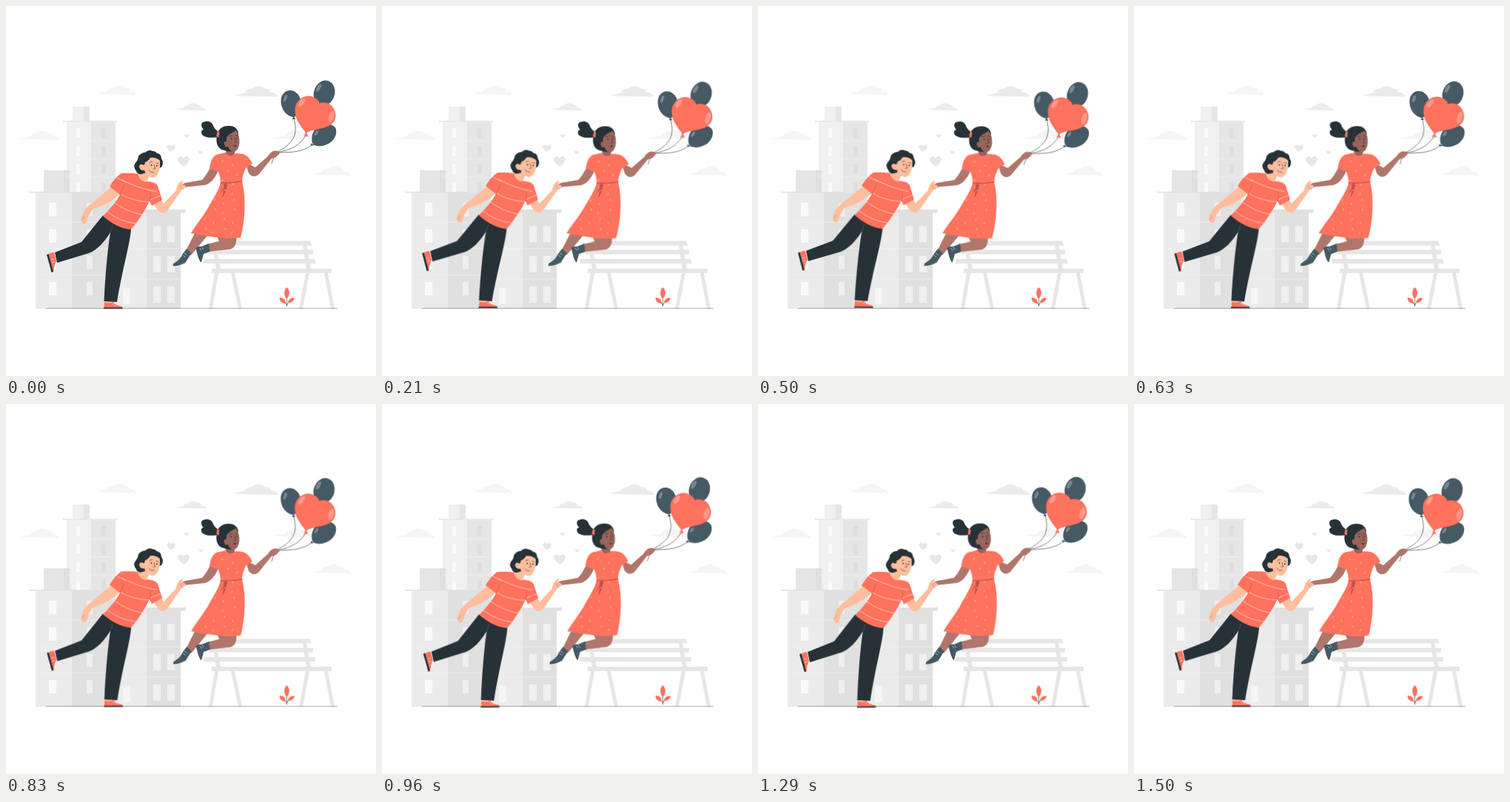
Recreate the animation shown at these times as an HTML page. Size 500 by 500 pixels, loop 1.54 s.

```html
<!DOCTYPE html>
<html lang="en">
<head>
<meta charset="utf-8">
<title>Couple with balloons</title>
<style>
html, body { margin: 0; width: 100%; height: 100%; overflow: hidden; background: #fff; }
svg { display: block; width: 100vw; height: 100vh; }
path { stroke-linecap: round; stroke-linejoin: round; }
.red { fill: #ff725e; }
.ink { fill: #263238; }
.slate { fill: #455a64; }
.peach { fill: #ffbe9d; }
.brown { fill: #b0766b; }
.face { fill: #98645b; }
.g0 { fill: #f5f5f5; }
.g1 { fill: #f0f0f0; }
.g2 { fill: #ebebeb; }
.g3 { fill: #e6e6e6; }
.g4 { fill: #e0e0e0; }
.line { fill: none; stroke: #263238; stroke-width: .6; }
.ground { opacity: .6; }
.thin { fill: none; stroke: #fff; stroke-width: .7; opacity: .75; }
.fold { fill: none; stroke: #8f3a32; stroke-width: .7; }
.shine { fill: #fff; opacity: .28; }
</style>
</head>
<body>
<svg viewBox="0 0 500 500">
  <defs>
    <path id="cloud" d="M0 12C5 9 9 10 13 8C14 4 18 4 21 4C23 0 32-1 36 3C40 3 43 5 43 8C47 7 51 10 52 13Z"/>
    <path id="heart" d="M.1 .9C-.5 .6-1.100 .1-1-.4C-.9-.9-.2-1 0-.4C.2-1 .9-.9 1-.4C1.050 .1 .6 .6 .1 .9Z"/>
  </defs>

  <g id="clouds">
    <use href="#cloud" class="g0" x="124" y="107"/>
    <use href="#cloud" class="g0" x="20" y="168"/>
    <use href="#cloud" class="g0" x="414" y="216"/>
    <use href="#cloud" class="g0" x="364" y="167"/>
    <use href="#cloud" class="g2" transform="translate(230 131) scale(.79)"/>
    <use href="#cloud" class="g2" transform="translate(308 108) scale(1.15 1.13)"/>
  </g>

  <g id="city">
    <path class="g1" d="M90 136h15v20H90zM82 157h33v252H82z"/>
    <path class="g3" d="M105 136h8v20h-8zM115 157h33v252h-33zM77 155h73v1.800H77z"/>
    <path class="g2" d="M145 279h45v130h-45z"/>
    <path class="g4" d="M190 279h46v130h-46zM162 275h81v4.500h-81z"/>
    <path class="g3" d="M51 222h35v29H51z"/>
    <path class="g4" d="M78 222h8v29h-8zM89 252h56v157H89zM31 251h85v1.600H31z"/>
    <path class="g2" d="M40 252h49v157H40z"/>
    <g id="windows"></g>
  </g>

  <g id="bench" class="g3">
    <path d="M283 317.500H411L413 323.500H283zM275 329.500H415V335.500H275zM267 342H418V348H267zM278 355H440V361H278z"/>
    <path d="M279 323h5l6 33h-6zM401 323h5l6 33h-6zM282 361h5L279 409h-5zM304 361h5L319 409h-5zM405 361h5L401 409h-5zM430 361h5L444 409h-5z"/>
  </g>

  <g id="plant">
    <path class="line" d="M379.500 406V392M379.500 404Q377 400 375 398M379.500 404Q382 399 386 397.500"/>
    <path class="red" d="M379.500 396C375 391 375 384 379.500 380C384 384 384 391 379.500 396ZM378 402C372 402 369.500 398 369.500 394C375 394 378 397 378 402ZM381 401C382 396 386 393.500 390 395C389 399 385 401.500 381 401Z"/>
  </g>

  <path class="line ground" d="M54 408.500H447.500"/>
  <g id="hearts" class="g3"></g>

  <g id="couple">
    <g id="strings" class="line">
      <path d="M389 152C396 176 386 187 366 197.500M405 175C398 187 386 195 366 198M413 188C401 197 388 198 366 198Q361 204 359 213"/>
    </g>
    <g id="balloons" transform="translate(.6 .6)">
      <g class="slate">
        <ellipse cx="429.500" cy="117" rx="14" ry="17.300" transform="rotate(18 429.500 117)"/>
        <path d="M388 150C377 148 370 137 371 126C372 116 380 112 387 114C395 117 399 125 398 134C397 142 393 148 388 150ZM388 149l3 3.500h-5z"/>
        <path d="M414 187C411 178 413 168 421 163C429 158 441 157 445 165C448 174 441 184 432 187C425 190 419 189 414 187ZM415 185l-4.500 1 3 3z"/>
      </g>
      <path class="red" stroke="#d9594a" stroke-width=".35" d="M405 171C398 162 389 151 390 139C391 126 402 120 411 121.500C418 123 422 127 423 131C428 128.500 436 130 440 135C447 144 446 155 438 160C428 167 413 165 405 171ZM405 170l2.500 5.500-5-.5z"/>
      <g class="shine">
        <ellipse cx="399" cy="130" rx="3" ry="6.500" transform="rotate(35 399 130)"/>
        <ellipse cx="439" cy="149" rx="3.600" ry="8" transform="rotate(15 439 149)"/>
        <ellipse cx="377" cy="124" rx="2" ry="5" transform="rotate(20 377 124)"/>
        <ellipse cx="422" cy="110" rx="2.500" ry="6" transform="rotate(30 422 110)"/>
        <ellipse cx="419" cy="171" rx="1.800" ry="4" transform="rotate(35 419 171)"/>
      </g>
    </g>

    <g id="woman">
      <path class="brown" d="M283 306L311 308C313 321 309 329 300 329L274 332 271 322 288 318Z"/>
      <path class="brown" d="M256 305L274 308 250 337 243 331Z"/>
      <path class="slate" d="M244 328L250.500 334 243 346C237 349 232 351 226 351Q225 348 228 347Q236 342 238 336ZM274 321L275.500 332 267 335 264 346Q261 346 257 327Q259 324 264 325Z"/>
      <path class="line" d="M226 351.200Q237 350 243 346.500M257 327Q260 342 263.500 346"/>
      <path class="thin" d="M239 337l3 2M241 334l3 2M262 327l2 3M265 326l1.500 3"/>
      <path class="brown" d="M278 215L287 222C282 234 276 240 269 242L244 244.500 236 248 234 243 242 239 265 235C269 231 273 224 278 215Z"/>
      <path class="brown" d="M323 210L331 215 337 218 354 203C358 197 362 194 368 196.500Q371 199 368 201Q364 206 359 206L342 227C337 232 332 231 328 226Z"/>
      <path class="face" d="M298 188L310 190 309 199Q309 207 304 207Q297 206 297 200Z"/>
      <path class="red" d="M297 198Q302 206 311 199L320 200Q328 202 333 213L324 219C321 226 319 231 319 237C325 260 323 291 317 313Q302 315 287 313Q264 310 250 307C255 298 266 285 274 271C281 258 288 249 290 238Q290 231 287 224L275 219Q277 205 284 201Z"/>
      <path class="fold" d="M290 239Q304 240 319 237M297 239Q299 248 293 257M297 240Q295 247 291 251"/>
      <path fill="#c54e42" d="M294 241q5-3 5 2q-2 4-6 14q2-12 1-16z"/>
      <path id="specks" class="thin"/>
      <g class="ink">
        <path d="M288 177C281 178 270 179 265 174C263 170 264 168 267 167C263 163 263 157 268 156.500C273 154.500 279 157 280 162Q283 168 288 170Z"/>
        <path d="M285 176C285 167 293 161 302 162C310 162 315 168 314 175L309 195Q302 198 295 195C286 194 283 184 285 176Z"/>
      </g>
      <path class="red" d="M285.500 169.500q3-1 3 2l-1 6q-3 0-3-3z"/>
      <path class="face" d="M298 178C301 173 306 171 311 168Q316 175 315.500 185Q314 196 308 197Q302 196 300 190C294 191 293 182 298 183Z"/>
      <path class="line" d="M302 176l4-1M310 175l3 .5M309 178l2 6-2 .5"/>
      <g class="ink"><circle cx="304.500" cy="179.500" r=".9"/><circle cx="312" cy="179" r=".8"/></g>
      <path d="M307 188.500q3-1 5 0q-2 3-5 0z" fill="#5d2f2c"/>
      <circle cx="297" cy="190" r=".8" fill="#ff725e"/>
    </g>

    <g id="man">
      <path class="peach" d="M143 244L157 250C148 261 136 269 118 274Q111 282 109 292Q107 296 103 293L101 289Q104 275 114 268Q128 257 143 244Z"/>
      <path class="peach" d="M196 263L207 258 213 267 230 249Q230 243 235 238L239 236 238 241 243 243Q242 248 237 249L219 275Q213 283 206 277Z"/>
      <path fill="#fff" d="M62 334L70 331 72 346 66 347Z"/>
      <path class="red" d="M57 336Q60 333 65 333L68 345Q65 350 64 360L62 359Z"/>
      <path class="ink" d="M55 336L57.500 335 64 359 61.500 360Z"/>
      <path class="peach" d="M135 397h11v6h-11z"/>
      <path class="ink" d="M131 283L169 301C168 320 158 352 150 400L132.500 399C134 366 137 331 141 306C133 319 123 330 112 334L69 347 66 333 102 319Q114 304 131 283Z"/>
      <path class="line" style="stroke:#56636a" d="M141 306Q143 301 144 297"/>
      <path class="red" d="M133 400Q139 403 145 400Q148 405 157 406V408H132.500Z"/>
      <path class="ink" d="M132 407.500h25.500v1.700H132z"/>
      <path class="thin" d="M144 403l3-1M147 405l2-1.500M61 343l4-1M62 347l3.500-1"/>

      <path class="red" d="M156 226Q169 225 179 227Q182 236 191 237Q203 238 205 243L211 262 197 270 194 264Q184 284 169 302Q151 301 131 284Q147 268 154 255L140 244Q146 233 156 226Z"/>
      <path class="thin" d="M150 232L161 238M157 235Q177 246 203 251M155 254Q171 264 194 265M147 266Q163 278 184 282M137 278Q153 291 175 294M195 262L209 256"/>
      <path class="line" style="stroke:#c34e42" d="M154 255Q158 249 159 242M194 264Q196 258 195 252"/>
      <path class="peach" d="M181 217L195 226 190 238Q181 237 178 228Z"/>
      <path class="ink" d="M184 227Q177 228 176 223Q171 217 175 212Q178 209 179 203Q183 198 188 198Q193 193 198 196Q202 196 204 199Q210 200 210 206Q214 212 210 218L205 219Z"/>
      <path class="peach" d="M188 211Q192 210 195 205Q202 204 208 209Q209 220 205 227Q201 234 195 231Q189 228 187 222Q181 223 180 217Q181 212 186 215Q188 214 188 211Z"/>
      <path class="line" d="M194 211.500q2-2 4-1M203 212l3 1M200 214l1.500 6h-2.500M193 222q3 4 7 3"/>
      <g class="ink"><circle cx="196.500" cy="215" r=".9"/><circle cx="204" cy="216" r=".9"/></g>
      <path class="line" style="stroke:#d98268" d="M234 243l4 1M235 246l3 .5M104 289l2-5M182 217l2 2"/>
    </g>
  </g>
</svg>

<script>
const $ = id => document.getElementById(id);
const add = (parent, tag, attrs) => {
  const el = document.createElementNS('http://www.w3.org/2000/svg', tag);
  for (const k in attrs) el.setAttribute(k, attrs[k]);
  return parent.appendChild(el);
};

// Window columns: x, first y, width, height, row step, rows, fill
const columns = [
  [95, 165, 5, 13, 24.5, 4, '#fafafa'],
  [129, 165, 6, 13, 24.5, 4, '#dedede'],
  [58, 266, 10, 18, 35.7, 4, '#fafafa'],
  [109, 266, 8, 18, 35.7, 4, '#f0f0f0'],
  [199, 297, 10, 22, 41, 3, '#f0f0f0'],
  [218, 297, 10, 22, 41, 3, '#f0f0f0'],
  [158, 381, 10, 22, 41, 1, '#f5f5f5'],
];
for (const [x, y, width, height, step, rows, fill] of columns)
  for (let i = 0; i < rows; i++)
    add($('windows'), 'rect', { x, y: y + i * step, width, height, fill });

// Storey lines: x1, x2, first y, step, count
for (const [x1, x2, y, step, n] of [[82, 148, 182, 24.5, 3], [40, 145, 292, 35.7, 3], [145, 236, 328, 41, 2]])
  for (let i = 0; i < n; i++)
    add($('windows'), 'path', { d: `M${x1} ${y + i * step}H${x2}`, stroke: '#f4f4f4', 'stroke-width': .6 });

for (const [x, y, r] of [[223, 192, 5.5], [240, 209.5, 7.7], [244, 176, 3], [263, 198, 2.6]])
  add($('hearts'), 'use', { href: '#heart', transform: `translate(${x} ${y}) scale(${r})` });
for (const [cx, cy] of [[231, 168], [220, 171], [208, 178], [232, 186], [254, 181], [251, 195]])
  add($('hearts'), 'circle', { cx, cy, r: .6 });

// Short strokes scattered over the dress
let d = '';
for (let row = 0; row < 8; row++)
  for (let col = 0; col < 5; col++) {
    const y = 209 + row * 13 + (col % 2) * 5;
    const left = y < 240 ? 289 : 289 - (y - 240) * .5;
    const x = left + 4 + (col + (row % 2) * .5) * 13;
    if (x < 317 && y < 308)
      d += `M${x} ${y}l${(row + col) % 2 ? 1 : -1} 1.8`;
  }
$('specks').setAttribute('d', d);

const couple = $('couple');
couple.style.transformOrigin = '250px 250px';
couple.animate([
  { transform: 'rotate(0deg)', offset: 0 },
  { transform: 'rotate(1deg)', offset: .25 },
  { transform: 'rotate(-1deg)', offset: .75 },
  { transform: 'rotate(0deg)', offset: 1 },
], { duration: 1540, iterations: Infinity });
</script>
</body>
</html>
```
